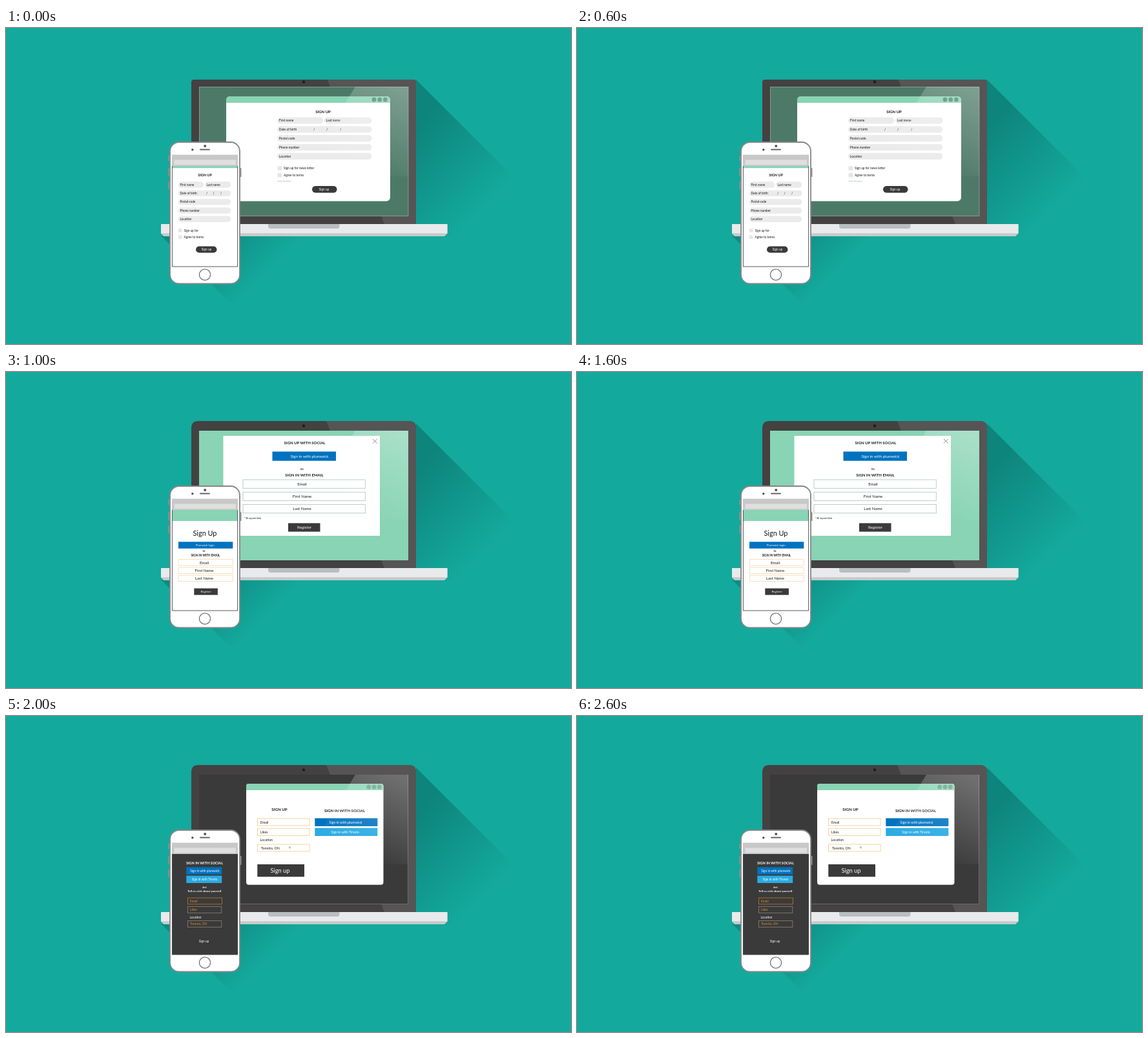
An HTML page that plays this animation: 875x490 px, repeating every 3 s.

```html
<!DOCTYPE html>
<html lang="en">
<head>
<meta charset="utf-8">
<title>Sign-up forms on two devices</title>
<style>
html, body { margin: 0; width: 100%; height: 100%; overflow: hidden; background: #14a99d; }
svg { display: block; width: 875px; height: 490px; font-family: Lato, sans-serif; }
</style>
</head>
<body>
<svg id="stage" viewBox="0 0 875 490"></svg>
<script>
const DARK = '#3b3a3a', MINT = '#88d4b4', BLUE = '#0072bf', SKY = '#29abe2', PILL = '#ebebeb',
      AMBER = '#f7c987', ORANGE = '#d98c35', INK = '#161616';

const box = (x, y, w, h, fill, more = '') =>
  `<rect x="${x}" y="${y}" width="${w}" height="${h}" fill="${fill}" ${more}/>`;
const dot = (x, y, r, fill, more = '') => `<circle cx="${x}" cy="${y}" r="${r}" fill="${fill}" ${more}/>`;
const poly = (points, fill) => `<polygon points="${points}" fill="${fill}"/>`;
const frame = (x, y, w, h, color, fill = 'none') =>
  box(x, y, w, h, fill, `stroke="${color}" stroke-width=".8"`);
// Text is placed by its vertical middle.
const text = (x, y, size, str, fill = INK, more = '') =>
  `<text x="${x}" y="${y}" dy=".36em" font-size="${size}" fill="${fill}" ${more}>${str}</text>`;
const mid = (x, y, size, str, fill, more = '') => text(x, y, size, str, fill, 'text-anchor="middle" ' + more);
const bold = (x, y, size, str, fill) => mid(x, y, size, str, fill, 'font-weight="700"');
const button = (x, y, w, h, fill, size, str, tx = x + w / 2, more = '') =>
  box(x, y, w, h, fill, more) + mid(tx, y + h / 2, size, str, '#fff');

const lid = (y, r) => {
  const shape = `M287 304V${y + r}q0 ${-r} ${r} ${-r}H${635 - r}q${r} 0 ${r} ${r}V304z`;
  return `<path d="${shape}" fill="#434142"/>` +
    `<path d="M${496 + (y - 76) * .4} ${y}H${635 - r}q${r} 0 ${r} ${r}V304H586z" fill="#565455"/>` +
    dot(461, 83.5, 2.2, '#1e1d1d');
};
const screen = fill => box(299, 91, 324, 201, fill);
const browser = (x, y, w, h, r, dots, dotFill) =>
  box(x, y, w, h, '#fff', `rx="${r}"`) +
  `<path d="M${x} ${y + 10}v${r - 10}q0 ${-r} ${r} ${-r}h${w - 2 * r}q${r} 0 ${r} ${r}v${10 - r}z" fill="${MINT}"/>` +
  dots.map(cx => dot(cx, y + 5, 3.4, dotFill)).join('');

// Grey pill form; the name fields share the first row.
const pillForm = (x, width, split, rows, h, size, slashes) => {
  const pill = (px, y, w, str) =>
    box(px, y - h / 2, w, h, PILL, `rx="${h / 2}"`) + text(px + 2.8, y, size, str);
  return pill(x, rows[0], split, 'First name') +
    pill(x + split + 1.7, rows[0], width - split - 1.7, 'Last name') +
    ['Date of birth', 'Postal code', 'Phone number', 'Location']
      .map((label, i) => pill(x, rows[i + 1], width, label)).join('') +
    slashes.map(sx => mid(sx, rows[1], size, '/')).join('');
};
const check = (x, y, side, size, str) =>
  box(x, y - side / 2, side, side, '#e6e6e6') + text(x + side + 3, y, size, str);
const fieldList = (x, w, h, tops, cx, size, color) =>
  ['Email', 'First Name', 'Last Name'].map((label, i) =>
    frame(x, tops[i], w, h, color) + mid(cx, tops[i] + h / 2, size, label)).join('');

const laptops = [
  lid(80, 4) + screen('#4d7a68') +
  frame(299.5, 91.5, 323.5, 200, '#8da69b') +
  browser(341, 106, 254, 162.5, 6, [570, 578.7, 587.4], '#4d8871') +
  bold(491, 130, 6, 'SIGN UP') +
  pillForm(420, 146.5, 71.3, [143.5, 157.3, 171.2, 185, 198.9], 10.2, 4.9, [477, 497, 518]) +
  check(420.5, 217.5, 6.5, 4.8, 'Sign up for news letter') +
  check(420.5, 228.3, 6.5, 4.8, 'Agree to terms') +
  text(420.5, 237, 2.6, 'Terms and remarks', '#2b8375') +
  button(474, 245, 38.5, 10.4, DARK, 4.8, 'Sign up', 492.5, 'rx="5.2"'),

  lid(76, 11) + screen(MINT) +
  box(336.5, 99, 242.5, 155, '#fff') +
  bold(462.5, 109.5, 6, 'SIGN UP WITH SOCIAL') +
  '<path d="M568 104l6.6 6.6m0-6.6l-6.6 6.6" stroke="#444" stroke-width=".8"/>' +
  button(412.5, 123.4, 98.5, 14.3, BLUE, 6.2, 'Sign in with plumwick', 470) +
  bold(458.5, 150.3, 4.5, 'Or') +
  bold(462, 159.5, 6, 'SIGN IN WITH EMAIL') +
  fieldList(367, 189.3, 13.3, [167, 186.2, 205.5], 458.5, 6.1, '#a9bfbf') +
  text(369, 226.5, 3.1, '**All required fields') +
  button(437, 234.4, 49.5, 13.2, DARK, 6.2, 'Register', 462),

  lid(76, 11) + screen(DARK) +
  '<path d="M299 291.5H622.5V91" fill="none" stroke="#777" stroke-width=".8"/>' +
  browser(372, 105, 212.5, 156.7, 4, [561.7, 570, 578.2], '#699f89') +
  bold(423.5, 145.2, 6.2, 'SIGN UP') +
  bold(524.5, 147, 6.1, 'SIGN IN WITH SOCIAL') +
  [159, 174.3, 199].map(y => frame(389.5, y, 80.5, 11, AMBER)).join('') +
  text(394, 165, 5.2, 'Email') + text(394, 180, 5.2, 'Likes') +
  text(393.5, 192.3, 5.2, 'Location') + text(395, 204.7, 5.25, 'Toronto, ON') +
  '<path d="M438 203h3l-1.5 2.5z" fill="none" stroke="#666" stroke-width=".5"/>' +
  button(389.3, 230, 72.7, 19.3, DARK, 9.3, 'Sign up', 424.5) +
  button(478.3, 158.5, 97, 12.4, BLUE, 5.35, 'Sign in with plumwick', 526) +
  button(478.3, 173.6, 97, 12.4, SKY, 5.2, 'Sign in with Tirvelo', 525)
];

const phones = [
  box(257, 214, 102, 3.2, MINT) +
  bold(308, 228, 5.5, 'SIGN UP') +
  pillForm(266.8, 81.5, 39.4, [243, 256.4, 269.7, 283, 296.3], 9.4, 4.7, [311, 321.5, 333]) +
  check(267, 314, 5.6, 4.7, 'Sign up for') +
  check(267, 324.3, 5.6, 4.7, 'Agree to terms') +
  button(294, 338.4, 32.5, 10.2, DARK, 4.8, 'Sign up', 310.5, 'rx="5.1"'),

  box(257, 214, 102, 17, MINT) +
  mid(308, 249.7, 10.9, 'Sign Up') +
  button(267, 263.3, 84.3, 10.4, BLUE, 4.4, 'Plumwick login', 308.3) +
  bold(306.5, 278, 3.6, 'Or') +
  bold(309, 284.5, 4.55, 'SIGN IN WITH EMAIL') +
  fieldList(267.2, 84, 9.4, [290.7, 303, 315.2], 307, 6, '#f9d5ad') +
  button(291.3, 335.5, 36.6, 10.2, DARK, 4.5, 'Register'),

  box(257, 214, 102, 156, DARK) +
  bold(307.5, 228, 5.5, 'SIGN IN WITH SOCIAL', '#fff') +
  button(279.3, 234.4, 54.9, 11.2, BLUE, 4.75, 'Sign in with plumwick', 308) +
  button(279.3, 247.6, 54.9, 11.4, SKY, 4.75, 'Sign in with Tirvelo', 307.5) +
  bold(307.3, 265.5, 3.4, 'And', '#fff') +
  bold(307.3, 271.5, 4.5, 'Tell us a bit about yourself', '#fff') +
  frame(281.5, 282, 53, 9.8, '#b9792f') + text(285, 287, 4.9, 'Email', ORANGE) +
  frame(281.5, 295.5, 52.3, 9.8, '#8c8378') + text(285, 300.5, 4.9, 'Likes', ORANGE) +
  text(284.5, 312, 4.8, 'Location', '#fff') +
  frame(281.5, 317.5, 52.3, 9.8, '#8c8378') + text(285, 322.5, 4.8, 'Toronto, ON', ORANGE) +
  mid(306.5, 349.3, 4.8, 'Sign up', '#fff')
];

const fade = (id, x1, y1, x2, y2, color, alpha) =>
  `<linearGradient id="${id}" gradientUnits="userSpaceOnUse" x1="${x1}" y1="${y1}" x2="${x2}" y2="${y2}">` +
  `<stop stop-color="${color}" stop-opacity="${alpha}"/><stop offset="1" stop-color="${color}" stop-opacity="0"/></linearGradient>`;
const steps = list => list.map((body, i) => `<g data-step="${i}">${body}</g>`).join('');

const shadows =
  poly('635,80 805,250 732,323 683,323 635,304', 'url(#lidShade)') +
  poly('240,322 254,336 300,336 300,322', '#0e8b82') +
  poly('318,397 352,431 505,332 496,322 363,322 350,397', 'url(#phoneShade)');

const base =
  poly('240,304 683.5,304 683.5,318.5 679,323 244,323 240,318.5', '#c6cacc') +
  box(240, 304, 443.5, 14.3, '#e8eaeb') +
  '<path d="M406 304h110.500v3q0 4-4 4h-102.500q-4 0-4-4z" fill="#b9bec2"/>';

const phoneBody =
  [[251.5, 198, 8], [251.5, 217, 13], [251.5, 238, 12], [362, 217, 14]]
    .map(([x, y, h]) => box(x, y, 2.5, h, '#97908f', 'rx="1"')).join('') +
  box(254, 177, 108, 219.5, '#fff', 'rx="14" stroke="#858688" stroke-width="1.8"') +
  dot(308.2, 183, 2, '#555') + dot(288.8, 188.7, 1.7, '#555') +
  box(300, 187.5, 16, 2, '#666', 'rx="1"') +
  dot(308, 382.5, 8.6, '#fff', 'stroke="#777" stroke-width="1.4"') +
  box(257, 196.5, 102, 17.5, '#c8c8c8') + box(260.5, 204.5, 95.5, 7.7, '#dfdfdf');

const stage = document.getElementById('stage');
stage.innerHTML =
  '<defs>' +
  fade('lidShade', 640, 150, 755, 265, '#0b776f', .72) +
  fade('phoneShade', 363, 318, 413, 368, '#0b776f', .45) +
  fade('glare', 600, 91, 540, 215, '#fff', .27) + '</defs>' +
  box(0, 0, 875, 490, '#14a99d') + shadows + steps(laptops) +
  poly('541,91 623,91 623,230 456,230', 'url(#glare)') +
  base + phoneBody + steps(phones) +
  '<path d="M257.400 214V370H358.600V214" fill="none" stroke="#444" stroke-width=".9"/>';

const groups = stage.querySelectorAll('[data-step]');
function draw() {
  const step = Math.floor(performance.now() / 1000) % 3;
  groups.forEach(g => g.style.display = +g.dataset.step === step ? '' : 'none');
  requestAnimationFrame(draw);
}
draw();
</script>
</body>
</html>
```
